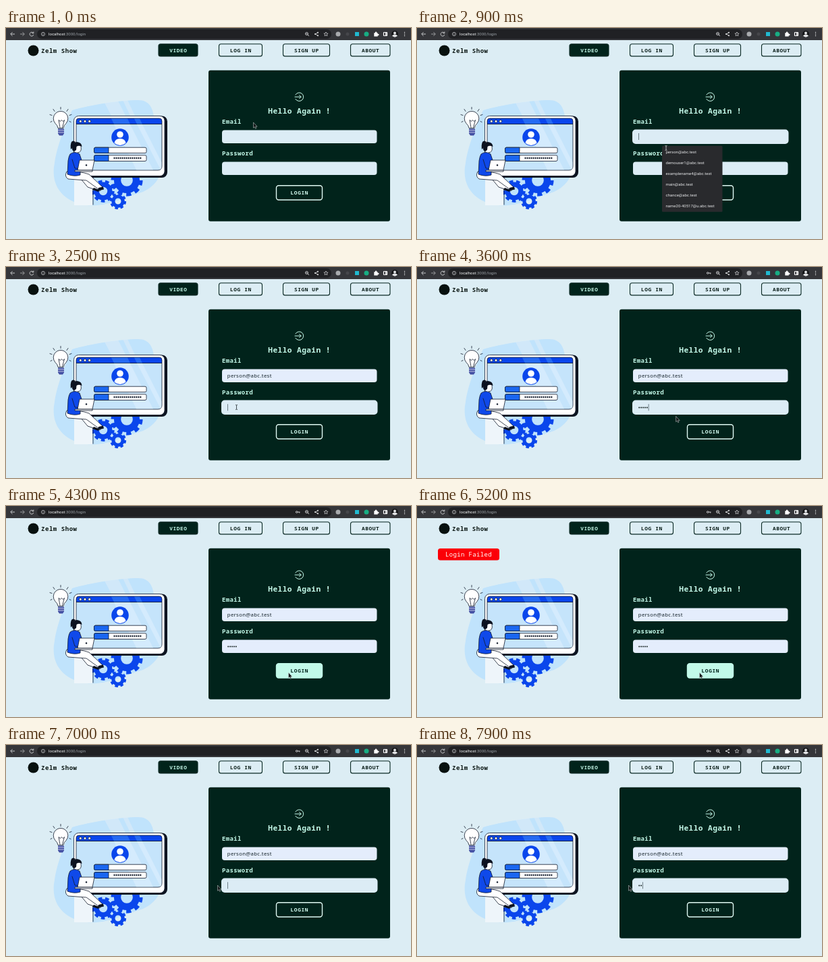
These frames come from a looping animation (600x313 px, 8 s). An HTML page:

```html
<!DOCTYPE html>
<html lang="en">
<head>
<meta charset="utf-8">
<title>Login form</title>
<style>
  html, body { margin: 0; width: 100%; height: 100%; overflow: hidden; background: #dcedf4; }
  svg { display: block; width: 100vw; height: 100vh; }
  .mono { font: 600 9px "Noto Sans Mono", "DejaVu Sans Mono", monospace; letter-spacing: .35px; }
  .small { font-size: 7.8px; font-weight: 700; letter-spacing: .6px; text-anchor: middle; }
  .bar { font: 6px Roboto, "Liberation Sans", sans-serif; }
  .value { font: 7.8px "Noto Sans", "Open Sans", sans-serif; fill: #16252b; letter-spacing: .3px; }
  .line { fill: none; stroke: #111a2b; stroke-width: .8; stroke-linecap: round; stroke-linejoin: round; }
  .ink { stroke: #111a2b; stroke-width: .8; stroke-linejoin: round; }
  .icon { fill: none; stroke: #d5d6d8; stroke-width: .9; }
</style>
</head>
<body>
<svg viewBox="0 0 600 313" preserveAspectRatio="none">
  <rect width="600" height="313" fill="#dcedf4"/>

  <g id="browser">
    <rect width="600" height="18" fill="#35363a"/>
    <rect x="46" y="2" width="436" height="14" rx="7" fill="#202124"/>
    <g class="icon">
      <path d="M13 9H7M9.500 6.200L6.700 9l2.800 2.800"/>
      <path d="M21 9h6M24.500 6.200L27.300 9l-2.800 2.800" stroke="#a5a6a9"/>
      <path d="M40.200 7.200A2.900 2.900 0 1 0 40.800 10M40.800 5.500v2.300h-2.300"/>
      <circle cx="55" cy="9" r="2.600" stroke-width=".7"/>
      <path d="M55 8.500v2M55 7.100v.6" stroke-width=".7"/>
      <circle cx="445.500" cy="8.500" r="2"/><path d="M447 10l2 2M444.500 8.500h2"/>
      <path d="M458 9l4-2.200M458 9l4 2.200"/>
      <path d="M474 6l.9 2 2.200.2-1.700 1.400.5 2.200-1.900-1.200-1.900 1.200.5-2.200-1.700-1.400 2.200-.2z" stroke-width=".7"/>
      <rect x="559.500" y="6.500" width="5" height="5" rx=".5" stroke="#fff" stroke-width="1.200"/>
      <path d="M562.800 6.500v5" stroke="#fff" stroke-width="1.500"/>
    </g>
    <g id="key" class="icon"><circle cx="430.700" cy="9" r="1.300"/><path d="M432 9h3.500M434.700 9v1.500"/></g>
    <g fill="#e3e4e6">
      <circle cx="458" cy="9" r="1"/><circle cx="462" cy="6.800" r="1"/><circle cx="462" cy="11.200" r="1"/>
      <circle cx="492" cy="9" r="3.500" fill="#a9abae"/>
      <circle cx="506" cy="9" r="2.500" fill="#46474b"/>
      <rect x="517" y="6" width="6" height="6" fill="#20b9d0"/>
      <circle cx="534" cy="9" r="3.500" fill="#18ad83"/>
      <path d="M545.300 7.200h1.700a1.200 1.200 0 1 1 2.200 0h1.500v1.700a1.200 1.200 0 1 1 0 2v1.500h-5.400z" fill="#fff"/>
      <circle cx="576" cy="9" r="5" fill="#17181a"/>
      <path d="M571.800 11.600q4.200-4 8.400 0-4.200 4.200-8.400 0"/><circle cx="576" cy="7.400" r="2"/>
      <circle cx="590.500" cy="6.500" r=".7"/><circle cx="590.500" cy="9" r=".7"/><circle cx="590.500" cy="11.500" r=".7"/>
    </g>
    <text class="bar" x="63" y="11.200" fill="#f1f3f4">localhost<tspan fill="#9aa0a6">:3000/login</tspan></text>
  </g>

  <circle cx="40.500" cy="33.500" r="8" fill="#08110f"/>
  <text class="mono" x="52" y="36.700" fill="#0b1613" style="letter-spacing:.55px;font-weight:700">Zelm Show</text>
  <g id="nav"></g>

  <g id="art">
    <path fill="#c0e3fc" d="M98 122C125 114 170 107 196 107 212 107 217 118 219 131L229 165C240 205 228 232 203 243 172 252 140 271 106 260 80 251 66 230 72 200 76 172 90 140 98 122Z"/>
    <path fill="#dcedf8" opacity=".6" d="M146 111l20-3 12 24h-21zM173 107h7l12 25h-7z"/>
    <g id="gears"></g>
    <path d="M101 214h27v49h-27z" fill="#eef5fa"/><path class="line" d="M129 221v41"/>
    <rect x="104" y="130.500" width="135" height="91.500" rx="8" fill="#0d1420"/>
    <rect x="100.500" y="130.500" width="134.500" height="89" rx="7" fill="#fff" class="ink"/>
    <path d="M104 142.500h127V205q0 6-6 6H104z" fill="#c5e4fb" class="ink"/>
    <path d="M104 142.500V138q0-4 4-4h119q4 0 4 4v4.500z" fill="#0a46ec" class="ink"/>
    <path fill="#e9f6ff" opacity=".4" d="M160 143h24l34 67.500h-25zM194 143h8l28.500 56v14z"/>
    <path fill="#4fa0fa" opacity=".4" d="M156 134.500h24l4 8h-24zM190 134.500h8l4 8h-8z"/>
    <g class="ink" fill="#fff"><circle cx="110.300" cy="138.400" r="1.900"/><circle cx="117" cy="138.400" r="1.900"/><circle cx="123.700" cy="138.400" r="1.900"/></g>
    <circle cx="169" cy="162" r="12.800" fill="#0a46ec"/>
    <circle cx="169" cy="158" r="4.800" fill="#fff"/><path d="M160.500 170.800q1-6.800 8.500-6.800t8.500 6.800q-8.500 6.500-17 0" fill="#fff"/>
    <g class="ink">
      <rect x="130.500" y="177.200" width="77.500" height="8.300" rx="2" fill="#fff"/><path d="M132.500 177.200H152v8.300h-19.500q-2 0-2-2v-4.300q0-2 2-2z" fill="#1a66f0"/>
      <rect x="130.500" y="188.700" width="77.500" height="8.800" rx="2" fill="#fff"/><path d="M132.500 188.700H152v8.800h-19.500q-2 0-2-2v-4.800q0-2 2-2z" fill="#1a66f0"/>
    </g>
    <path d="M160.500 193h39" stroke="#111a2b" stroke-width="2.300" stroke-linecap="round" stroke-dasharray="0 2.990"/>

    <g id="bulb" transform="translate(2 -.5)">
      <path class="ink" fill="#fff" stroke-width=".6" d="M75 149q-.5-4-4-7a10.800 10.800 0 1 1 16 0q-3.500 3-4 7z"/>
      <path class="line" d="M78 148l-2-11 2.500 2 2-2 2 2 2-2-3 11" stroke-width=".6"/>
      <path d="M75 150h9v7l-2 3h-5l-2-3z" fill="#4350a4"/><path d="M75 152.500h9M75 155.500h9" stroke="#fff" stroke-width=".7"/>
      <path class="line" d="M79 121v-3M70 124l-2-3M88 124l2-3M66 130l-3-1M92 130l3-1M66 139l-2 1M92 139l2 1" stroke-width=".6"/>
    </g>

    <g id="woman">
      <path class="ink" fill="#fff" d="M101 175q5-5 10 0l.3 5q-1 5-4.800 4.500l.3 4-6-1z"/>
      <path d="M98 179q0-9.500 7-10 7 .5 7.500 7-5-2.500-8 0l-.5 5-3 2q-3-1-3-4z" fill="#0c1220"/>
      <path d="M103 169q-4-3-6 0-2 4-1 11 4-3 4-8z" fill="#0c1220"/>
      <path class="ink" fill="#fff" d="M94 215l27 3 9 14 12 6-3 4-18-6-10-12-17-1z"/>
      <path class="ink" fill="#fff" d="M90 213q-4 7 2 11l27 2 18 13 6-3-20-19q-14-5-33-4z"/>
      <path d="M137 237l7-1.500 1 4-9 2zM130 237l8 3-1 3-9-3z" fill="#0c1220"/>
      <path class="ink" fill="#0f49ea" d="M95 187q7-5 14 0l4 12-3 13 0 6q-9 3-19-1l1-20q1-7 3-10z"/>
      <path class="line" d="M98 195l4 13 10 1" stroke="#fff"/>
      <path class="ink" fill="#fff" d="M109 196h22l-3 15h-22z"/><path class="ink" fill="#fff" d="M102 211h26v2h-26z"/>
      <circle cx="119" cy="203.500" r="1.200" fill="#111a2b"/>
    </g>
  </g>

  <g id="toast">
    <rect x="31" y="63" width="91" height="17.500" rx="3.500" fill="#fb0007"/>
    <text class="mono" x="42" y="75" fill="#fff" style="font-weight:400">Login Failed</text>
  </g>

  <rect x="300" y="62.700" width="269" height="224" rx="3" fill="#01231b"/>
  <path fill="none" stroke="#c9f9ea" stroke-linecap="round" stroke-linejoin="round"
    d="M428.900 99a6.300 6.300 0 1 1 0 6.400M428 102.200h9M434.500 99.600l2.600 2.600-2.600 2.600"/>
  <text class="mono" x="434.600" y="127" text-anchor="middle" fill="#c4f8e8" style="font-size:11.2px;letter-spacing:.4px">Hello Again !</text>
  <text class="mono" x="320" y="141.700" fill="#c4f8e8">Email</text>
  <text class="mono" x="320" y="188.500" fill="#c4f8e8">Password</text>
  <rect id="email"/><rect id="password"/>
  <text id="address" class="value" x="327.800" y="163.800">person@abc.test</text>
  <g id="dots" fill="#14201f"></g>
  <rect id="caret" width=".8" height="10" fill="#53636a"/>
  <rect id="login" x="400.500" y="233.800" width="68" height="21.200" rx="3.500" stroke-width="1.400"/>
  <text id="loginText" class="mono small" x="434.800" y="247.200">LOGIN</text>

  <g id="menu">
    <rect x="363" y="174.700" width="89.500" height="98" rx="1.500" fill="#292a2d"/>
    <rect id="hover" x="363" y="176.500" width="89.500" height="16" fill="#45464a"/>
  </g>
  <path id="arrow" d="M0 0v8.200l1.800-1.500 1.200 2.600 1.400-.6-1.200-2.500h2.400z" fill="#15191a" stroke="#d7dddd" stroke-width=".5"/>
  <path id="beam" d="M-1.500-3.500Q0-3.500 0-2.500V2.500Q0 3.500-1.500 3.500M1.500-3.500Q0-3.500 0-2.500M0 2.500Q0 3.500 1.500 3.500" fill="none" stroke-width=".8"/>
</svg>
<script>
const $ = id => document.getElementById(id);
const LOOP = 8000;
const EMPTY = "#dcecf5", FILLED = "#e4edfc", DARK = "#01231b", MINT = "#c2fae9";

function add(parent, tag, attrs, text = "") {
  const node = document.createElementNS("http://www.w3.org/2000/svg", tag);
  set(node, attrs);
  node.textContent = text;
  parent.append(node);
  return node;
}
function set(node, attrs) {
  for (const name in attrs) node.setAttribute(name, attrs[name]);
}
const show = (node, on) => set(node, { opacity: +on });
const ramp = (t, from, to) => Math.min(1, Math.max(0, (t - from) / (to - from)));
const smooth = u => u * u * (3 - 2 * u);
const within = (t, from, to) => t >= from && t < to;

for (const [label, x, width] of [["VIDEO", 226, 58], ["LOG IN", 315.5, 64], ["SIGN UP", 410.5, 69], ["ABOUT", 510.5, 58.5]]) {
  const active = label === "VIDEO";
  add($("nav"), "rect", { x, y: 23.7, width, height: 18.2, rx: 3, fill: active ? DARK : "none", stroke: "#0a2924", "stroke-width": 1.1 });
  add($("nav"), "text", { class: "mono small", x: x + width / 2 + .4, y: 36.2, fill: active ? "#c4f8e8" : "#0a1d19" }, label);
}

function gear(cx, cy, r, teeth) {
  const step = 2 * Math.PI * r / teeth;
  const ring = { cx, cy, fill: "none", stroke: "#0a46ec" };
  add($("gears"), "circle", { ...ring, r, "stroke-width": r * .3, "stroke-dasharray": `${step * .55} ${step * .45}` });
  add($("gears"), "circle", { ...ring, r: r * .68, "stroke-width": r * .5 });
}
gear(179, 226, 20.5, 10);
gear(144, 242, 14.5, 9);
gear(166, 257, 10.5, 8);

["person@abc.test", "demouser1@abc.test", "examplename4@abc.test", "main@abc.test", "chance@abc.test", "name20-40517@u.abc.test"]
  .forEach((mail, i) => add($("menu"), "text", { class: "bar", x: 368.5, y: 186.3 + i * 15.85, fill: "#e4e5e7" }, mail));

const dots = [0, 1, 2, 3, 4].map(i => add($("dots"), "circle", { cx: 329.2 + i * 2.9, cy: 208.6, r: 1 }));

// time, x, y of the pointer
const pointerPath = [
  [0, 366.5, 140], [100, 366.5, 140], [400, 367, 160], [600, 368, 163], [900, 369, 178], [1050, 374, 182],
  [1300, 374, 183], [1500, 351.5, 197], [1800, 343, 205], [2100, 341.5, 208], [3400, 341.5, 208],
  [3700, 398, 226], [4100, 418.5, 247], [5400, 418.5, 247], [5900, 364, 212], [6500, 363, 212],
  [6850, 313.5, 208], [8000, 313.5, 208]
];
function pointerAt(t) {
  const i = Math.max(1, pointerPath.findIndex(p => p[0] > t));
  const [t0, x0, y0] = pointerPath[i - 1], [t1, x1, y1] = pointerPath[i];
  const u = smooth(ramp(t, t0, t1));
  return [x0 + (x1 - x0) * u, y0 + (y1 - y0) * u];
}

function dotCount(t) {
  if (t < 2900) return 0;
  if (t < 7000) return Math.min(5, 1 + Math.floor((t - 2900) / 120));
  return (t >= 7600) + (t >= 7800);
}

function field(node, y, focused, fill) {
  const grow = focused ? 1 : 0;
  set(node, { x: 320 - grow, y: y - grow, width: 229.5 + 2 * grow, height: 19.3 + 2 * grow, rx: 4 + grow, fill });
}

function draw(t) {
  const onEmail = within(t, 500, 2100);
  const onPassword = within(t, 2100, 4200) || t >= 5950;
  const count = dotCount(t);
  field($("email"), 151.6, onEmail, t < 1300 ? EMPTY : FILLED);
  field($("password"), 198.6, onPassword, count && !onPassword ? FILLED : EMPTY);
  show($("address"), t >= 1050);
  dots.forEach((dot, i) => show(dot, i < count));

  // The blink restarts with every focus change or key press.
  const lastInput = [500, 1300, 2100, 2900, 3380, 5950, 7000, 7600, 7800].filter(e => e <= t).pop();
  const blink = (t - lastInput) % 1000 < 500;
  show($("caret"), (onEmail || onPassword) && blink);
  const textEnd = $("address").getComputedTextLength() + 327.8;
  set($("caret"), onEmail
    ? { x: t < 1300 ? 328 : textEnd, y: 156 }
    : { x: 328 + count * 2.9 + (count ? .2 : 0), y: 203.3 });

  set($("menu"), { opacity: t < 600 ? 0 : t < 1300 ? 1 : .55 * Math.pow(1 - ramp(t, 1300, 1700), 3) });
  show($("hover"), within(t, 1000, 1300));

  const hot = within(t, 3950, 5600);
  set($("login"), { fill: hot ? MINT : DARK, stroke: hot ? MINT : "#e0f8f2" });
  set($("loginText"), { fill: hot ? DARK : "#d5faef" });

  const slide = 1 - Math.pow(1 - ramp(t, 4500, 4900), 3);
  set($("toast"), { transform: `translate(${-125 * (1 - slide)} 0)`, opacity: 1 - ramp(t, 6650, 6850) });
  show($("key"), t >= 2900);

  const [x, y] = pointerAt(t);
  const beam = within(t, 300, 1000) || within(t, 1850, 3550) || within(t, 5750, 6780);
  const onMenu = y > 173 && within(t, 600, 1000);
  const transform = `translate(${x.toFixed(2)} ${y.toFixed(2)})`;
  set($("arrow"), { transform });
  set($("beam"), { transform, stroke: onMenu ? "#d5dadb" : "#20282b" });
  show($("arrow"), !beam);
  show($("beam"), beam);
}

const start = performance.now();
function tick() {
  draw((performance.now() - start) % LOOP);
  requestAnimationFrame(tick);
}
tick();
</script>
</body>
</html>
```
